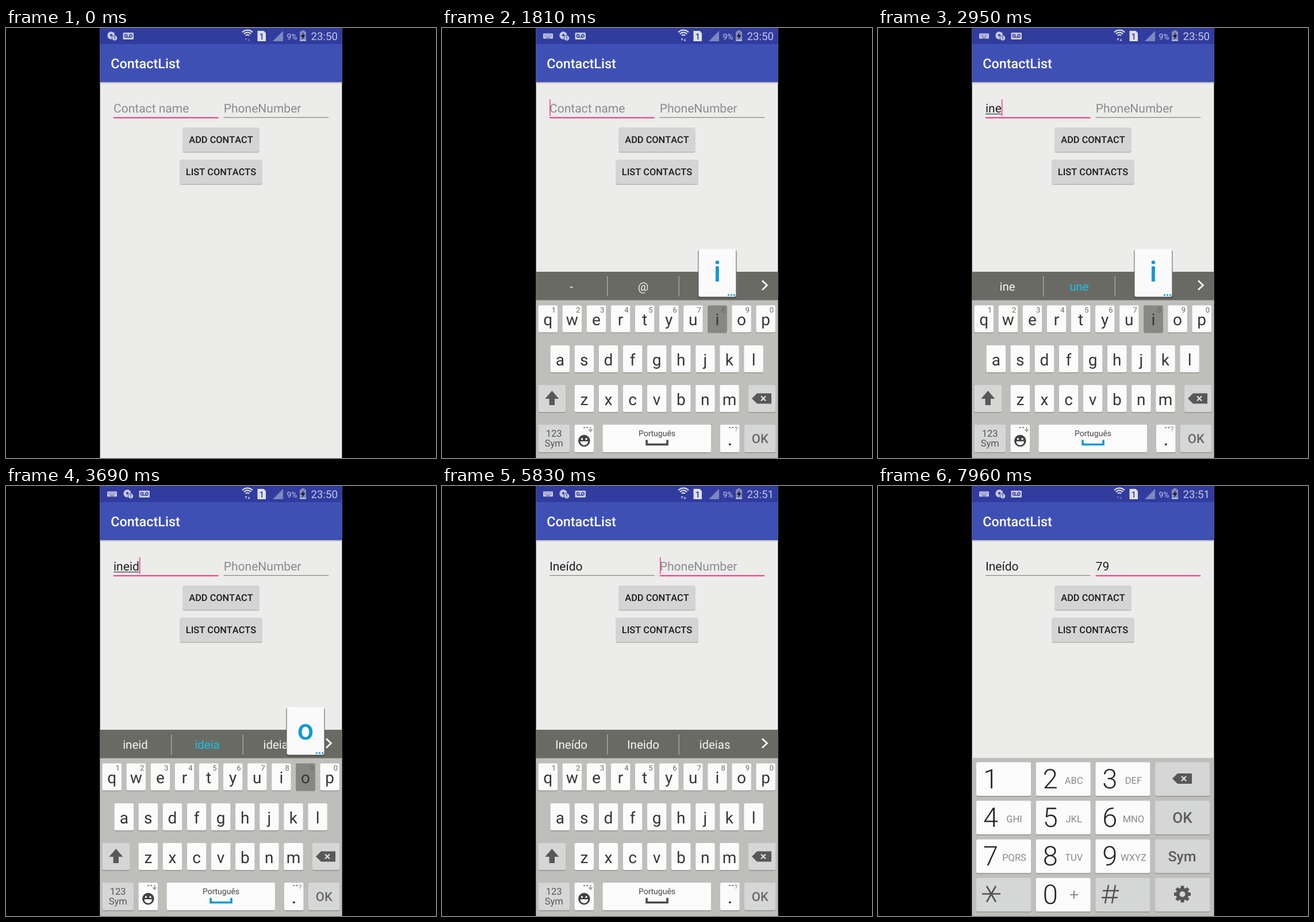
Write an HTML page that moves like this. It is 748 px wide and 748 px high and loops after 8 s.

```html
<!DOCTYPE html>
<html lang="en">
<head>
<meta charset="utf-8">
<title>ContactList</title>
<style>
  html, body { margin: 0; width: 100%; height: 100%; overflow: hidden; background: #000; }
  svg {
    display: block; width: 100vw; height: 100vh; font-family: Roboto, sans-serif;
    font-kerning: none; text-rendering: geometricPrecision;
  }
  .mid { text-anchor: middle; }
  .medium { font-weight: 500; }
  .field { font-size: 21.04px; }
  .letter { font-size: 28px; fill: #363636; }
  .hint { font-size: 13px; fill: #696969; }
  .word { font-size: 20.5px; }
  .digit { font-size: 47px; font-weight: 300; fill: #262626; }
  .group { font-size: 16.5px; fill: #8a8a8a; }
</style>
</head>
<body>
<svg id="stage" viewBox="0 0 748 748"></svg>
<script>
const LOOP = 8000;
const LEFT = 163.6, WIDTH = 420.8;
const PINK = '#ff4081', CYAN = '#18c3e8', ICON = '#c6c9e6', DARK = '#585858';
const STATUS = '#303c9e', PAD = '#bebfba', GREY_KEY = '#d5d7d6';

const rect = (x, y, w, h, fill, extra = '') =>
  `<rect x="${x}" y="${y}" width="${w}" height="${h}" fill="${fill}" ${extra}/>`;
const band = (y, h, fill) => rect(LEFT, y, WIDTH, h, fill);
const text = (x, y, content, cls = '', extra = '') =>
  `<text x="${x}" y="${y}" class="${cls}" ${extra}>${content}</text>`;
const path = (d, extra = '') => `<path d="${d}" ${extra}/>`;
const stroke = (color, width) => `fill="none" stroke="${color}" stroke-width="${width}"`;

// A raised key: soft lower edge below a rounded face.
const key = (x, y, w, h, fill = '#fbfbfb', id = '') =>
  rect(x, y + 1.5, w, h, '#92948d', 'rx="2.5"') +
  rect(x, y, w, h, fill, `rx="2.5" ${id && `id="${id}"`}`);

const backspace = (x, y) =>
  path(`M${x - 17} ${y}l9 -9h25v18h-25z`, `fill="${DARK}"`) +
  path(`M${x - 1} ${y - 4}l8 8m0 -8l-8 8`, stroke('#e4e4e4', 2.2));

function statusBar() {
  const wifi = [4, 8, 12].map(r =>
    path(`M${420 - r * .75} ${16 - r * .7}A${r} ${r} 0 0 1 ${420 + r * .75} ${16 - r * .7}`,
      stroke('#d9dbee', 2.2))).join('');
  const keyboardIcon = rect(176, 9.5, 17, 9, ICON, 'rx="1"') +
    path('M178 12h13M178 14.5h13', stroke(STATUS, 1.2) + ' stroke-dasharray="1.4 1.3"') +
    path('M181 17h7', stroke(STATUS, 1));
  return band(0, 28, STATUS) +
    `<g id="keyboardIcon">${keyboardIcon}</g>` +
    `<g id="notices"><circle cx="183" cy="13" r="6.7" fill="${ICON}"/>
      <circle cx="183" cy="12.5" r="2" fill="${STATUS}"/>
      <circle cx="189" cy="17.5" r="4.8" fill="${ICON}" stroke="${STATUS}"/>
      ${path('M189 14.7v3.3m0 1.2v1.2', stroke(STATUS, 1.3))}
      ${rect(203.5, 8, 18.5, 12, ICON, 'rx="1.5"')}
      <g ${stroke(STATUS, 1.4)}><circle cx="208.5" cy="13.5" r="2.2"/>
      <circle cx="217" cy="13.5" r="2.2"/><path d="M208 16h9.5"/></g></g>` +
    wifi +
    path('M415.5 18h4l-2 4.5zM420.5 22.5h4l-2 -4.5z', `id="traffic" fill="${ICON}"`) +
    path('M437.5 5h11l3.5 4v14h-14.5z', 'fill="#dfe1f1"') +
    text(444.8, 19.5, '1', 'mid medium', `font-size="15" fill="${STATUS}"`) +
    path('M482 5v18h-18z', 'fill="#7e87bd"') +
    text(488.5, 19.5, '9%', '', `font-size="14" fill="${ICON}"`) +
    rect(514, 4, 5, 3, '#8389b8') + rect(511, 6, 11, 16.5, '#8389b8', 'rx="1"') +
    rect(511, 20.5, 11, 2, ICON) +
    path('M518 7.5l-5.5 7.5h3.5l-1 5.5 5.5 -8h-3.5z', 'fill="#111730"') +
    text(530.5, 21, '', '', `id="clock" font-size="18.7" fill="${ICON}"`);
}

function app() {
  const button = (x, y, w, label) =>
    rect(x - .5, y + 1, w + 1, 43, '#bcbcba', 'rx="2.5"') +
    rect(x, y, w, 42, '#d4d4d4', 'rx="2"') +
    text(374, y + 27, label, 'mid medium', 'font-size="16.36" fill="#1b1b1b"');
  return band(0, 748, '#ececeb') + band(94, 3, 'url(#shade)') + band(28, 66, '#3f50b5') +
    text(182.3, 69.5, 'ContactList', 'medium', 'font-size="23.37" fill="#fff"') +
    text(187, 146.5, '', 'field', 'id="name"') +
    text(378.7, 146.5, '', 'field', 'id="phone"') +
    rect(187, 155, 182.5, 1.2, '', 'id="nameLine"') +
    rect(378.7, 155, 182.5, 1.2, '', 'id="phoneLine"') +
    rect(187, 149, 0, 1.2, '#333', 'id="composing"') +
    rect(187, 124, 1.6, 29, PINK, 'id="caret"') +
    button(308, 173, 132, 'ADD CONTACT') + button(303, 229, 142, 'LIST CONTACTS');
}

const keyPlace = {};
function letterPad() {
  let out = band(473, 276, PAD) + band(424, 49.5, '#6a6a65') +
    path('M287.8 432v35M412.2 432v35', stroke('#b5b5b2', 1.2)) +
    path('M557 439.5l8.5 8 -8.5 8', stroke('#fff', 2.6)) +
    [225, 350, 474.5].map((x, i) => text(x, 457, '', 'word mid', `id="word${i}"`)).join('');
  ['qwertyuiop', 'asdfghjkl', 'zxcvbnm'].forEach((row, r) => {
    [...row].forEach((ch, i) => {
      const x = 167.5 + 21.05 * [0, 1, 3][r] + 42.1 * i, y = [482.5, 552, 621][r];
      keyPlace[ch] = { x: x + 16.7, y };
      out += key(x, y, 33.5, 47, '#fbfbfb', 'key-' + ch) +
        text(x + 16.7, y + 34.5, ch, 'letter mid');
      if (!r) out += text(x + 27, y + 12, (i + 1) % 10, 'hint mid');
    });
  });
  return out + key(167.5, 621, 47.5, 47, GREY_KEY) +
    path('M191.3 631l12 14h-7.3v11h-9.4v-11h-7.3z', `fill="${DARK}"`) +
    key(533, 621, 47.5, 47, GREY_KEY) + backspace(556, 644.5) +
    key(167.5, 690, 54.5, 48, GREY_KEY) +
    text(194.7, 711, '123', 'mid', 'font-size="16.5" fill="#555"') +
    text(194.7, 728, 'Sym', 'mid', 'font-size="16.5" fill="#555"') +
    key(230.5, 690, 33.5, 48) + `<circle cx="247.3" cy="718" r="10.3" fill="#424242"/>
      <circle cx="243.5" cy="715" r="1.7" fill="#fff"/><circle cx="251" cy="715" r="1.7" fill="#fff"/>` +
    path('M240.5 719h13.6a6.8 6.8 0 0 1 -13.6 0z', 'fill="#fff"') +
    path('M246 695h3m2 0h3', stroke('#888', 2)) +
    path('M258.5 694v5m-2.5 -1a2.5 2.5 0 0 0 5 0m-2.5 2.5v2.5', stroke('#888', 1.4)) +
    key(279.5, 690, 188.5, 48) +
    text(374, 710, 'Português', 'mid', 'font-size="14" fill="#444"') +
    path('M356 716.5v8h36v-8', stroke('#4a4a4a', 3.6) + ' id="space"') +
    key(484, 690, 33.5, 48) + text(500.8, 726, '.', 'letter mid medium') +
    path('M499 695h3m2 0h3', stroke('#888', 2)) +
    text(511.5, 702, '?', 'mid', 'font-size="12" fill="#888"') +
    key(526, 690, 54.5, 48, GREY_KEY) +
    text(553.3, 721.5, 'OK', 'mid medium', 'font-size="22" fill="#686868"') +
    `<g id="popup">${rect(-33.5, 1, 67, 85, '#555', 'rx="4"')}${rect(-32.5, 0, 65, 83, '#fafafa', 'rx="3"')}
      ${text(0, 56, '', 'mid medium', 'id="popupLetter" font-size="50" fill="#1598d2"')}
      ${path('M18 80h3m2 0h3m2 0h3', stroke('#1598d2', 2.6))}</g>`;
}

function numberPad() {
  const groups = ['', 'ABC', 'DEF', 'GHI', 'JKL', 'MNO', 'PQRS', 'TUV', 'WXYZ'];
  let out = band(473, 276, PAD);
  for (let r = 0; r < 4; r++) for (let c = 0; c < 4; c++) {
    const n = r * 3 + c + 1, isDigit = c < 3 && (r < 3 || c === 1);
    const label = r === 3 ? 0 : n, x = 171 + 103.7 * c, y = 480.5 + 67.1 * r;
    out += key(x, y, 95, 58.5, isDigit ? '#fbfbfb' : GREY_KEY, isDigit ? 'key-' + label : '');
    if (isDigit) out += text(x + 25, y + 45, label, 'digit mid') +
      (label ? text(x + 66, y + 37, groups[n - 1], 'group mid') : '');
  }
  const teeth = Array.from({ length: 8 }, (_, i) =>
    rect(526.5, 695.5, 6, 7, DARK, `transform="rotate(${i * 45} 529.5 710)"`)).join('');
  return out + backspace(529, 509) +
    text(529.5, 586, 'OK', 'mid medium', 'font-size="26" fill="#5c5c5c"') +
    text(529, 653, 'Sym', 'mid medium', 'font-size="25" fill="#5c5c5c"') +
    path('M181 709.5h32M189 696l16 27.5M205 696l-16 27.5', stroke('#505050', 2.6)) +
    path('M401 694l-6 32M413 694l-6 32M391 704h28M389 716h28', stroke('#505050', 2.4)) +
    path('M334 711h14m-7 -7v14', stroke('#8a8a8a', 2)) +
    teeth + `<circle cx="529.5" cy="710" r="8" ${stroke(DARK, 6)}/>`;
}

document.getElementById('stage').innerHTML =
  `<defs><linearGradient id="shade" x2="0" y2="1"><stop stop-color="#a5a5a8"/>
    <stop offset="1" stop-color="#ececeb"/></linearGradient></defs>
  <rect width="748" height="748"/>${app()}${statusBar()}
  <g id="letters">${letterPad()}</g><g id="numbers">${numberPad()}</g>`;

const el = {};
document.querySelectorAll('[id]').forEach(node => el[node.id] = node);

// Tracks hold [start time, value]; each value stays until the next start.
const at = (track, t) => track.reduce((found, step) => step[0] <= t ? step : found)[1];
const nameText = [[0, ''], [1970, 'i'], [2300, 'in'], [2790, 'ine'], [3030, 'inei'],
  [3370, 'ineid'], [3700, 'ineido'], [4840, 'Ineído']];
const phoneText = [[0, ''], [7220, '7'], [7470, '79']];
const presses = [['i', 1810, 1970], ['n', 2140, 2300], ['e', 2630, 2790], ['i', 2950, 3110],
  ['d', 3200, 3370], ['o', 3610, 3780], ['7', 7060, 7220], ['9', 7390, 7470]];
const suggestions = [[0, '- @ .'], [1970, 'i e o'], [2300, 'in em um'], [2790, 'ine une fine'],
  [3030, 'inei ideia idem'], [3370, 'ineid ideia ideias'], [3780, 'Ineído Ineido ideias']];
const slide = [[0, 330], [820, 220], [900, 80], [980, 0]];
const caretStarts = [330, 820, 1970, 2300, 2790, 3030, 3370, 3700, 4840, 5900, 7220, 7470];
const FOCUS_PHONE = 5820, NUMBER_PAD = 6150, BLINK = 490;

function show(node, visible) { node.style.display = visible ? '' : 'none'; }
function set(node, attrs) { for (const k in attrs) node.setAttribute(k, attrs[k]); }

function drawField(input, line, value, hint, focused) {
  input.textContent = value || hint;
  set(input, { fill: value ? '#202020' : '#8c8c8c' });
  set(line, { height: focused ? 2.2 : 1.2, fill: focused ? PINK : '#85837a' });
}

function render(t) {
  const name = at(nameText, t), phone = at(phoneText, t), onPhone = t >= FOCUS_PHONE;
  drawField(el.name, el.nameLine, name, 'Contact name', !onPhone);
  drawField(el.phone, el.phoneLine, phone, 'PhoneNumber', onPhone);

  const nameWidth = name ? el.name.getComputedTextLength() : 0;
  const phoneWidth = phone ? el.phone.getComputedTextLength() : 0;
  set(el.composing, { width: onPhone ? 0 : nameWidth });
  set(el.caret, { x: onPhone ? 378.9 + phoneWidth : 187 + nameWidth });
  const restart = caretStarts.filter(s => s <= t).pop();
  show(el.caret, restart !== undefined && Math.floor((t - restart) / BLINK) % 2 === 0);

  const noticed = t >= 1310;
  show(el.keyboardIcon, noticed);
  set(el.notices, { transform: `translate(${noticed ? 28 : 0})` });
  set(el.traffic, { opacity: t >= 980 && t < 7000 ? .9 : .4 });
  el.clock.textContent = t < 3860 ? '23:50' : '23:51';

  show(el.letters, t >= 820 && t < NUMBER_PAD);
  show(el.numbers, t >= NUMBER_PAD);
  set(el.letters, { transform: `translate(0 ${at(slide, t)})` });

  const correcting = t >= 1970 && t < 3780;
  at(suggestions, t).split(' ').forEach((word, i) => {
    const node = el['word' + i];
    const dim = i === 0 && t >= 4760 && t < 5090;
    node.textContent = word;
    set(node, { fill: dim ? '#85857f' : correcting && i === 1 ? CYAN : '#f4f4f2' });
  });
  set(el.space, { stroke: correcting ? '#1598d2' : '#4a4a4a' });

  presses.forEach(([ch]) => set(el['key-' + ch], { fill: '#fbfbfb' }));
  const press = presses.find(([, from, to]) => t >= from && t < to);
  if (press) set(el['key-' + press[0]], { fill: '#878785' });
  const place = press && keyPlace[press[0]];
  show(el.popup, !!place);
  if (place) {
    el.popupLetter.textContent = press[0];
    set(el.popup, { transform: `translate(${place.x} ${place.y - 98})` });
  }
}

function tick() {
  render(performance.now() % LOOP);
  requestAnimationFrame(tick);
}
tick();
</script>
</body>
</html>
```
